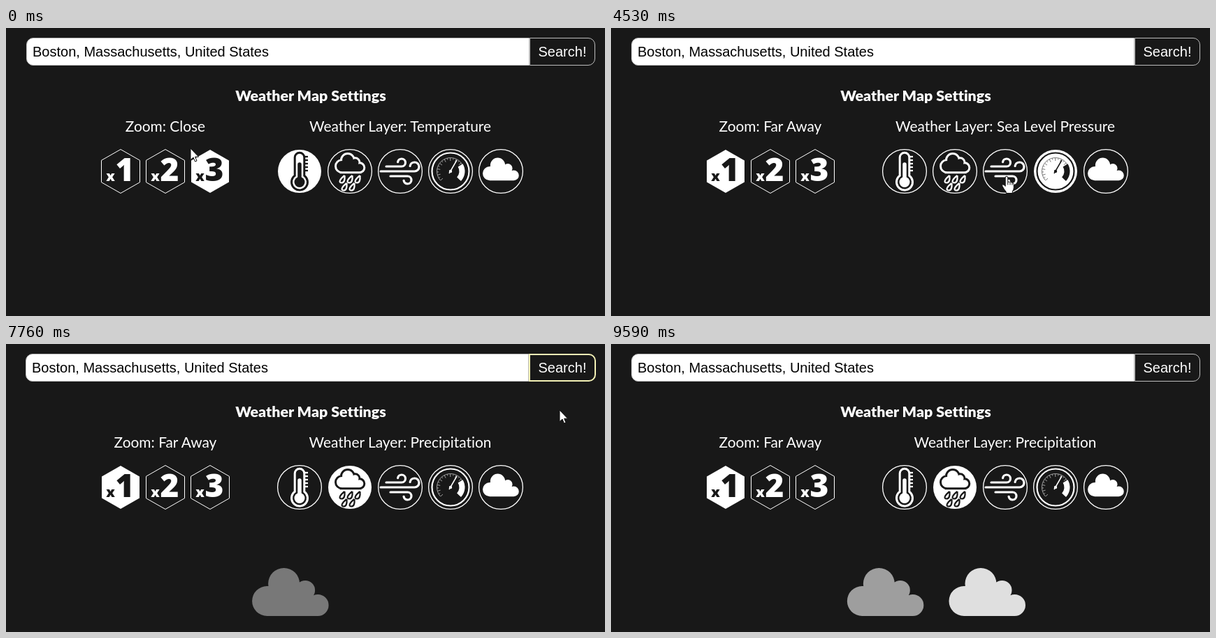
An HTML page with a canvas for the animation above (9610 ms loop, 857x414 px).

```html
<!DOCTYPE html>
<html lang="en">
<head>
<meta charset="utf-8">
<title>Weather map settings</title>
<style>
  html, body { margin: 0; width: 100%; height: 100%; overflow: hidden; background: #181818; }
  #stage { position: relative; width: 857px; height: 414px; overflow: hidden; color: #fff; }
  #stage > * { position: absolute; box-sizing: border-box; }
  canvas { left: 0; top: 0; }
  .bar { top: 14px; height: 40px; font: 20px/38px "Liberation Sans", Arial, sans-serif;
    white-space: nowrap; border: 1px solid #bdbdbd; }
  #place { left: 29px; width: 720px; padding-left: 8px; background: #fff; color: #000; border-radius: 10px 0 0 10px; }
  #search { left: 749px; width: 94px; text-align: center; border-radius: 0 10px 10px 0; }
  .lit #place { left: 28px; }
  .lit #search { left: 748px; width: 96px; line-height: 36px; border: 2px solid #f3f1b5; }
  .label { width: 400px; text-align: center; font: 20.9px/40px Lato, sans-serif;
    font-variant-ligatures: none; white-space: nowrap; }
  #title { left: 236px; top: 77px; font-size: 21.4px; font-weight: 900; }
  #zoom { left: 28px; top: 121px; }
  #layer { left: 364px; top: 121px; }
  #pointer { left: 0; top: 0; width: 30px; height: 30px; overflow: visible; }
  #pointer path { fill: #fff; stroke: #111; stroke-linejoin: round; }
</style>
</head>
<body>
<div id="stage">
  <canvas id="view" width="857" height="414"></canvas>
  <div id="place" class="bar">Boston, Massachusetts, United States</div>
  <div id="search" class="bar">Search!</div>
  <div id="title" class="label">Weather Map Settings</div>
  <div id="zoom" class="label"></div>
  <div id="layer" class="label"></div>
  <svg id="pointer">
    <path id="arrow" d="M0 0V16.5L4 13L6.5 19L9 18L6.6 12.2H11.6Z"/>
    <g id="hand">
      <path d="M-1.8 14V2a1.8 1.8 0 0 1 3.6 0v6.5q1.7-1 3.2.5 1.7-1 3 .7 2.2-.6 2.3 1.8v5q0 3-2 5.5v2.5h-9v-2q-3-3.5-5.3-8-1-2.5.8-2.6 1.5 0 3.4 2.6z"/>
      <path d="M1.8 8.5v4M5 9.5v3M8 10.2v2.5"/>
    </g>
  </svg>
</div>
<script>
const LOOP = 9610, STEP = 130.7, CLICK = 7145, BG = '#181818', TAU = Math.PI * 2;
const ROW = 206, hexX = i => 164 + i * 64, badgeX = i => 420 + i * 72;
const ZOOMS = ['Far Away', 'Medium', 'Close'];
const LAYERS = ['Temperature', 'Precipitation', 'Wind Speed', 'Sea Level Pressure', 'Clouds'];
const SPOTS = [...ZOOMS.map((_, i) => hexX(i)), ...LAYERS.map((_, i) => badgeX(i))];
const $ = id => document.getElementById(id);
const ctx = $('view').getContext('2d');

const clamp = k => Math.min(1, Math.max(0, k));
const ease = k => k * k * (3 - 2 * k);

const snap = t => Math.max(0, 7760 + STEP * Math.floor((t - 7760) / STEP));

// Pointer strokes: start, end, where to, sag of the path
const STROKES = [
  { from: 120, to: 385, x: 224, y: 200 },
  { from: 930, to: 1180, x: 168, y: 209 },
  { from: 2700, to: 3470, x: 640, y: 210, sag: 53 },
  { from: 4100, to: 4480, x: 566, y: 213 },
  { from: 5080, to: 5400, x: 500, y: 210 },
  { from: 5930, to: 6060, x: 532, y: 216 },
  { from: 6100, to: 6800, x: 795, y: 36 },
  { from: 7390, to: 7760, x: 792, y: 95 },
  { from: 7760, to: 8300, x: 845, y: 420 }
];

function circle(x, y, r) {
  ctx.beginPath();
  ctx.arc(x, y, r, 0, TAU);
}

function line(w, x0, y0, x1, y1) {
  ctx.lineWidth = w;
  ctx.beginPath();
  ctx.moveTo(x0, y0);
  ctx.lineTo(x1, y1);
  ctx.stroke();
}

function ink(c) {
  ctx.fillStyle = ctx.strokeStyle = c;
}

function at(x, y, scale, draw) {
  ctx.save();
  ctx.translate(x, y);
  ctx.scale(scale, scale);
  draw();
  ctx.restore();
}

const cloud = new Path2D('M21.5 69L23 26L76 32L94 50V69Z');
for (const [x, y, r] of [[21.5, 47.5, 21.5], [45.5, 22.5, 22.5], [76, 32, 14], [94, 53.5, 15.5]]) {
  cloud.moveTo(x + r, y);
  cloud.arc(x, y, r, 0, TAU);
}

function thermometer() {
  ctx.lineWidth = 3;
  ctx.beginPath();
  ctx.arc(0, -20, 6.8, Math.PI, 0);
  ctx.arc(0, 15.5, 11.5, -0.94, Math.PI + 0.94);
  ctx.closePath();
  ctx.stroke();
  circle(0, 15.5, 7.5);
  ctx.fill();
  ctx.lineCap = 'round';
  line(5.5, 0, -10, 0, 14);
  ctx.lineCap = 'butt';
  for (let i = 0; i < 5; i++) line(2.3, 7, -21 + i * 5, 12, -21 + i * 5);
}

function drop(x, y) {
  ctx.lineWidth = 2.2;
  ctx.beginPath();
  ctx.moveTo(x + 3.5, y - 6);
  ctx.bezierCurveTo(x + 4, y, x + 3, y + 4.5, x - 1, y + 4.5);
  ctx.bezierCurveTo(x - 5, y + 4.5, x - 4.5, y, x + 3.5, y - 6);
  ctx.stroke();
}

function rain(fg, bg) {
  at(-19, -24, 0.35, () => {
    ctx.lineWidth = 17;
    ctx.stroke(cloud);
    ink(bg);
    ctx.fill(cloud);
  });
  ink(fg);
  for (let i = 0; i < 5; i++) drop(i < 3 ? i * 11 - 11 : i * 11 - 41, i < 3 ? 12 : 23);
}

function gust(x0, x1, y, r, turn) {
  ctx.lineWidth = 3.2;
  ctx.beginPath();
  ctx.moveTo(x0, y);
  ctx.arc(x1, y - r * turn, r, turn * Math.PI / 2, -turn * Math.PI * 0.95, turn > 0);
  ctx.stroke();
}

function wind() {
  ctx.lineCap = 'round';
  gust(-20, 2, -7, 5.5, 1);
  gust(-28, 20.5, 0, 6.5, 1);
  gust(-14, 10.5, 7, 5.5, -1);
  ctx.lineCap = 'butt';
}

function gauge() {
  ctx.lineWidth = 2.2;
  circle(0, 0, 26.5);
  ctx.stroke();
  ctx.lineWidth = 0.6;
  ctx.beginPath();
  ctx.arc(0, 0, 19.5, 2.4, 7);
  ctx.stroke();
  for (let i = 0; i <= 20; i++) {
    const a = 2.4 + i * 0.23, c = Math.cos(a), s = Math.sin(a), r = i % 2 ? 17 : 15;
    line(0.6, c * r, s * r, c * 19, s * 19);
  }
  ctx.lineWidth = 8;
  ctx.beginPath();
  ctx.arc(0, 0, 16.5, -0.55, 0.75);
  ctx.stroke();
  line(1.5, -2, 3, 9, -16);
  circle(0, 0, 2.2);
  ctx.fill();
}

const ICONS = [thermometer, rain, wind, gauge, () => at(-26, -19.4, 0.473, () => ctx.fill(cloud))];

function hexagon(i, on) {
  at(hexX(i), ROW, 1, () => {
    const w = on ? 27 : 27.5, h = on ? 31 : 31.5;
    ink('#fff');
    ctx.lineWidth = 1;
    ctx.beginPath();
    for (let k = 0; k < 6; k++) {
      const a = k * TAU / 6;
      ctx.lineTo(w * Math.sin(a) / Math.sin(TAU / 6), -h * Math.cos(a));
    }
    ctx.closePath();
    on ? ctx.fill() : ctx.stroke();
    if (on) ink(BG);
    ctx.textAlign = 'center';
    ctx.font = '800 20px "Open Sans", sans-serif';
    ctx.fillText('x', -14.5, 14);
    ctx.font = '800 46px "Open Sans", sans-serif';
    ctx.fillText(i + 1, 6, 14);
  });
}

function badge(i, on) {
  at(badgeX(i), ROW, 1, () => {
    ink('#fff');
    ctx.lineWidth = 1.3;
    circle(0, 0, on ? 31 : 31.4);
    on ? ctx.fill() : ctx.stroke();
    const fg = on ? BG : '#fff';
    ink(fg);
    ICONS[i](fg, on ? '#fff' : BG);
  });
}

// Two clouds take turns drifting right, each lap starting brighter
function drift(t) {
  const life = 1924;
  ink('#fff');
  for (let i = 0; i < 2; i++) {
    const run = t - CLICK - i * life / 2;
    if (run < 0) continue;
    const lap = Math.floor(run / life), age = run % life;
    const fade = clamp(Math.min(age / 160, (life - age) / 250));
    ctx.globalAlpha = clamp(0.105 + age * 0.00051 + lap * 0.21) * fade;
    at(259 + age * 0.1514, 322, 1, () => ctx.fill(cloud));
  }
  ctx.globalAlpha = 1;
}

function movePointer(t) {
  let x = 264, y = 173;
  for (const s of STROKES) {
    const k = ease(clamp((t - s.from) / (s.to - s.from)));
    x += (s.x - x) * k;
    y += (s.y - y) * k + (s.sag || 0) * Math.sin(Math.PI * k);
  }
  const overButton = x > 749 && x < 843 && y > 14 && y < 54;
  const hand = overButton || SPOTS.some(cx => Math.hypot(x - cx, y - ROW) < 32);
  const gone = t > 8300;
  $('pointer').style.transform = `translate(${Math.round(x)}px, ${Math.round(y)}px)`;
  $('arrow').style.display = hand || gone ? 'none' : '';
  $('hand').style.display = hand && !gone ? '' : 'none';
}

function render(t) {
  const zoom = t < 650 ? 2 : t < 1770 ? 1 : 0;
  const layer = t < 3610 ? 0 : t < 4820 ? 3 : t < 5500 ? 2 : 1;
  $('zoom').textContent = 'Zoom: ' + ZOOMS[zoom];
  $('layer').textContent = 'Weather Layer: ' + LAYERS[layer];
  $('stage').className = t > 6670 && t < 9450 ? 'lit' : '';
  ctx.clearRect(0, 0, 857, 414);
  ZOOMS.forEach((_, i) => hexagon(i, i === zoom));
  LAYERS.forEach((_, i) => badge(i, i === layer));
  drift(snap(t));
  movePointer(snap(t));
}

const begin = performance.now();
function tick() {
  render((performance.now() - begin) % LOOP);
  requestAnimationFrame(tick);
}
tick();
</script>
</body>
</html>
```
